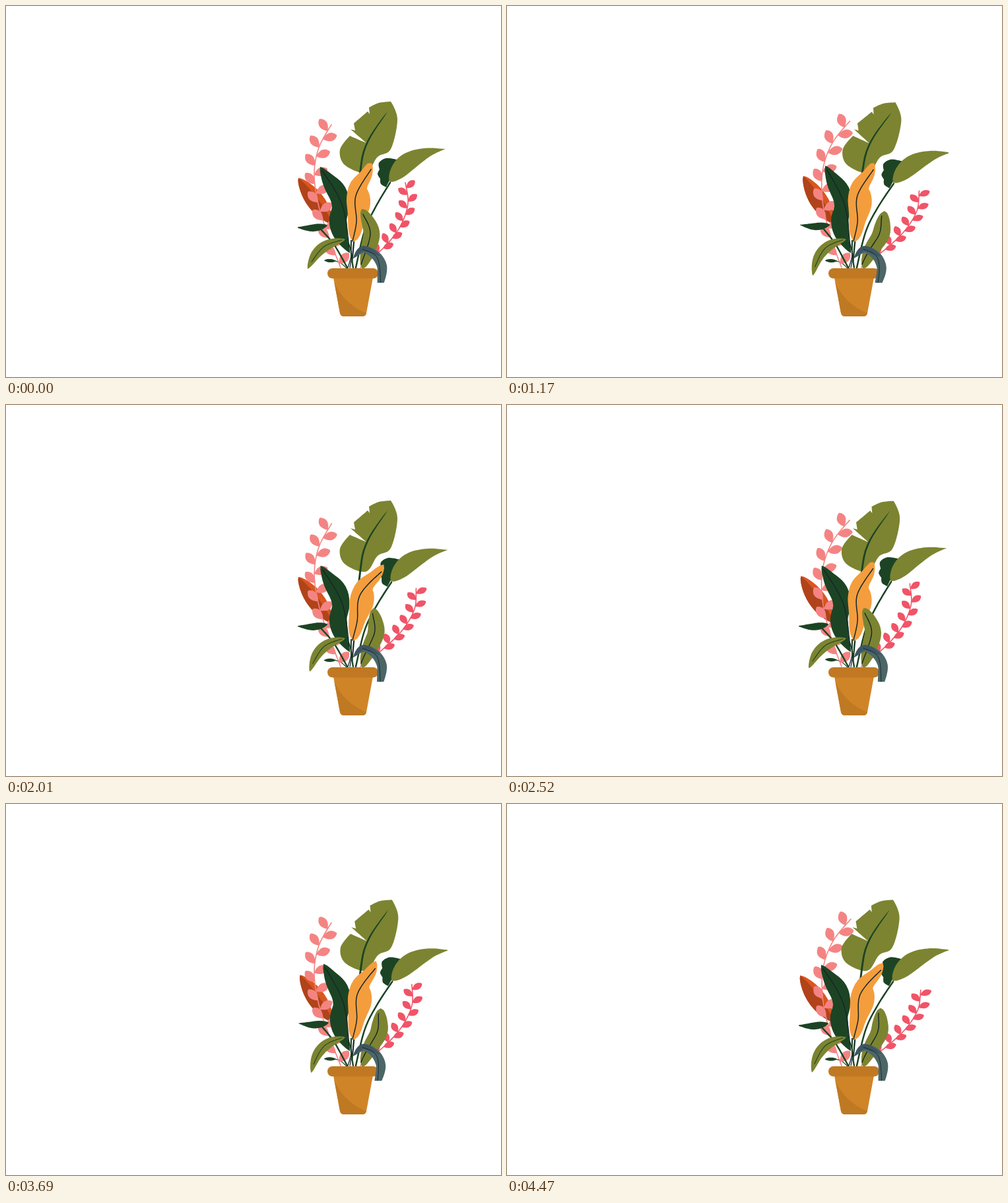
Write an HTML page with a canvas that moves like this. It is 750 px wide and 563 px high and loops after 4500 ms.

```html
<!DOCTYPE html>
<html lang="en">
<head>
<meta charset="utf-8">
<title>Swaying plant</title>
<style>
html, body { margin: 0; width: 100%; height: 100%; overflow: hidden; background: #fff; }
canvas { display: block; width: 750px; height: 563px; }
</style>
</head>
<body>
<canvas id="stage" width="750" height="563"></canvas>
<script>
const ctx = document.getElementById('stage').getContext('2d');
const LOOP = 4500, STEP = 30;
const GREEN = '#1c4424', OLIVE = '#7c8431', INK = '#14262a';
const PINK = '#f48483', ROSE = '#f05468';
const lerp = ([a, b], t) => a + (b - a) * t;

// "x y" pairs; a trailing ! marks a sharp corner
const parse = s => s.split(',').map(p => {
  const [x, y] = p.trim().split(' ').map(parseFloat);
  return { x, y, sharp: p.includes('!') };
});

// Smooth curve through key points, as a polyline
function smooth(keys, closed) {
  const n = keys.length, out = [], res = 10;
  const at = i => closed ? keys[(i + n) % n] : keys[Math.max(0, Math.min(n - 1, i))];
  const slope = (i, axis) => at(i).sharp ? 0 : (at(i + 1)[axis] - at(i - 1)[axis]) / 2;
  for (let i = 0; i < n - (closed ? 0 : 1); i++) {
    const mix = (axis, t) => {
      const h = t * t * (3 - 2 * t);
      return lerp([at(i)[axis], at(i + 1)[axis]], h) +
        slope(i, axis) * t * (1 - t) ** 2 - slope(i + 1, axis) * t * t * (1 - t);
    };
    for (let k = 0; k < res; k++) out.push({ x: mix('x', k / res), y: mix('y', k / res) });
  }
  if (!closed) out.push(keys[n - 1]);
  return out;
}

// Position and normal by arc length along a curve
function spine(keys) {
  const pts = smooth(keys), dist = [0];
  for (let i = 1; i < pts.length; i++)
    dist.push(dist[i - 1] + Math.hypot(pts[i].x - pts[i - 1].x, pts[i].y - pts[i - 1].y));
  const length = dist[pts.length - 1];
  const at = d => {
    const i = Math.max(1, dist.findIndex(v => v >= Math.min(d, length)));
    const a = pts[i - 1], b = pts[i], seg = dist[i] - dist[i - 1], f = (d - dist[i - 1]) / seg;
    return { x: lerp([a.x, b.x], f), y: lerp([a.y, b.y], f),
      nx: (a.y - b.y) / seg, ny: (b.x - a.x) / seg };
  };
  return { length, at };
}

// Leaf outline: half-width follows a skewed sine along the spine
function blade(color, keys, half, { skew = 1, round = .7, wave = 0, sides = [1, 1] } = {}) {
  const { length, at } = spine(keys), edges = [[], []], n = 28;
  for (let i = 0; i <= n; i++) {
    const u = i / n, p = at(u * length);
    const w = half * Math.max(0, Math.sin(Math.PI * u ** skew)) ** round * (1 + wave * Math.cos(4 * Math.PI * u));
    edges[0].push({ x: p.x + p.nx * w * sides[0], y: p.y + p.ny * w * sides[0] });
    edges[1].unshift({ x: p.x - p.nx * w * sides[1], y: p.y - p.ny * w * sides[1] });
  }
  return { color, pts: edges.flat() };
}

const leaf = (color, s, half, shape) => blade(color, parse(s), half, shape);
const outline = (color, s) => ({ color, pts: smooth(parse(s), true) });
const line = (color, width, s) => ({ color, width, pts: smooth(parse(s)) });

// Stem with alternating leaflets; tilt runs from the first leaflet to the last, clockwise from up
function sprig(color, s, { count, gap, size, tilts }) {
  const { at } = spine(parse(s)), shapes = [line(color, 1.6, s)];
  for (let i = 0; i < count; i++) {
    const base = at(gap * (i + .8)), a = lerp(tilts[i % 2], i / (count - 1)) * Math.PI / 180;
    const tip = { x: base.x + size * Math.sin(a), y: base.y - size * Math.cos(a) };
    shapes.push(blade(color, [base, tip], size * .29, { skew: 1.15 }));
  }
  return shapes;
}

// period in s, pivot, reach of the bend, full angle at that reach
const parts = [
  { period: 2.08, pivot: [517, 397], reach: 154, angle: .045, shapes: [
    leaf('#d9561f', '443 261,469 296,495 331', 13.5),
    leaf('#b0431a', '443 261,469 296,495 331', 13.5, { sides: [1, .35] })
  ] },
  { period: 1.325, pivot: [518, 397], reach: 38, angle: -.04, shapes: [
    leaf(GREEN, '482 386,500 387', 2.6),
    line(GREEN, 1.2, '496 386,507 390,516 398')
  ] },
  { period: 1.85, snap: true, pivot: [507, 397], reach: 217, angle: .129, grow: .025, clipTop: 162,
    shapes: sprig(PINK, '493 180,474 215,467 255,473 300,487 345,507 397',
      { count: 16, gap: 14.1, size: 22, tilts: [[-34, -50], [78, 42]] }) },
  { period: 3, pivot: [535, 398], reach: 148, angle: .178,
    shapes: sprig(ROSE, '605 268,609 300,597 335,572 367,537 397',
      { count: 12, gap: 10.3, size: 17, tilts: [[49, 68], [-60, -18]] }) },
  { period: 2.03, pivot: [524, 397], reach: 259, angle: .023, shapes: [
    outline(OLIVE, '583 145!,593 172,583 217,563 229,545 253,513 241,506 218,521 197!,' +
      '546 208!,522 187!,529 189!,527 178!,548 160!,551 164!,550 154!,565 147'),
    leaf(GREEN, '578 160,547 208,536 258,524 397', 1.5, { round: .4 })
  ] },
  { period: 2.7, pivot: [530, 397], reach: 160, angle: .036, shapes: [
    line(GREEN, 2.5, '582 268,560 305,543 342,530 397'),
    outline(GREEN, '592 233!,576 231,565 238,566 248!,563 255,567 262!,568 270,576 275!,585 255'),
    leaf(OLIVE, '666 217,637 223,606 239,581 267', 14, { skew: 1.6 })
  ] },
  { period: 2.25, pivot: [522, 390], reach: 151, angle: .042, shapes: [
    leaf(GREEN, '476 244,488 263,503 285,507 305,503 325,508 350,521 375', 14.5, { skew: .9, wave: -.1 }),
    line(INK, 1.4, '479 250,501 284,513 315,520 366')
  ] },
  { period: 2.25, pivot: [517, 397], reach: 97, angle: .052, shapes: [
    line(GREEN, 2.4, '477 339,497 362,517 397'),
    leaf(GREEN, '440 336,463 337,487 333', 5.5, { skew: 1.4 })
  ] },
  { still: true, shapes: [
    line(INK, 1.4, '520 362,523 378,518 397'),
    line(GREEN, 2.2, '523 356,523 376,526 397'),
    line(INK, 1.3, '527 356,525 376,521 397')
  ] },
  { period: 1.325, pivot: [526, 357], reach: 121, angle: .16, clipTop: 238.5, shapes: [
    leaf('#f49d3d', '553 236,546 255,534 275,534 302,530 330,527 358', 16.5, { skew: 1.1, round: .6, wave: .1 }),
    line(INK, 1.5, '553 248,530 288,531 327,525 357')
  ] },
  { period: 2.7, pivot: [540, 397], reach: 88, angle: .375, grow: .03, shapes: [
    leaf(OLIVE, '539 308,549 328,554 346,549 368,540 399', 12.5, { skew: .95, round: .55 }),
    line(INK, 1.4, '541 316,552 346,538 392')
  ] },
  { period: 2.7, pivot: [512, 354], reach: 71, angle: -.17, grow: .04, shapes: [
    leaf(OLIVE, '514 354,488 362,470 376,457 399', 8),
    line(GREEN, 1.1, '509 355,482 365,463 388')
  ] },
  { still: true, draw: pot },
  { period: 2.25, pivot: [540, 370], reach: 50, angle: .1, clipBottom: 420, shapes: [
    leaf('#4c6668', '526 383,541 370,557 376,567 388,570 402,565 434', 7.5, { skew: 1.2, round: .6 }),
    leaf('#3f5562', '526 383,541 368,567 379', 4),
    line(INK, .9, '540 369,563 383,568 428')
  ] }
];

function pot() {
  const body = new Path2D('M496 412H556L546 466Q545 471 540 471H512Q507 471 506 466Z');
  ctx.fillStyle = '#d08428';
  ctx.fill(body);
  ctx.save();
  ctx.clip(body);
  ctx.fillStyle = '#bf7923';
  ctx.fill(new Path2D('M494 410C502 436 520 456 548 467V473H490Z'));
  ctx.restore();
  ctx.fillStyle = '#c07922';
  ctx.beginPath();
  ctx.roundRect(487, 398, 77, 15.5, 7.7);
  ctx.fill();
}

// Rotation and stretch that grow with the distance from the pivot
function bender({ pivot: [px, py], reach, angle, grow = 0 }, v) {
  return p => {
    const dx = p.x - px, dy = p.y - py;
    const w = Math.min(1.1, Math.hypot(dx, dy) / reach) * v;
    const c = Math.cos(angle * w), s = Math.sin(angle * w), k = 1 + grow * w;
    return { x: px + (dx * c - dy * s) * k, y: py + (dx * s + dy * c) * k };
  };
}

function drawShape({ color, width, pts }, bend) {
  ctx.beginPath();
  for (const p of pts) {
    const { x, y } = bend(p);
    ctx.lineTo(x, y);
  }
  ctx.fillStyle = ctx.strokeStyle = color;
  ctx.lineWidth = width || 1;
  if (width) ctx.stroke();
  else ctx.fill();
}

function sway({ period, snap }, t) {
  const s = .5 - .5 * Math.cos(2 * Math.PI * t / period);
  return snap ? s * s * (3 - 2 * s) : s;
}

function render(ms) {
  const t = Math.floor(ms % LOOP / STEP) * STEP / 1000;
  ctx.clearRect(0, 0, 750, 563);
  ctx.lineCap = ctx.lineJoin = 'round';
  for (const part of parts) {
    if (part.draw) { part.draw(); continue; }
    const { clipTop = 144.5, clipBottom = 472 } = part;
    ctx.save();
    ctx.beginPath();
    ctx.rect(442, clipTop, 227, clipBottom - clipTop);
    ctx.clip();
    const bend = part.still ? p => p : bender(part, sway(part, t));
    part.shapes.forEach(shape => drawShape(shape, bend));
    ctx.restore();
  }
}

function tick() {
  render(performance.now());
  requestAnimationFrame(tick);
}
tick();
</script>
</body>
</html>
```
